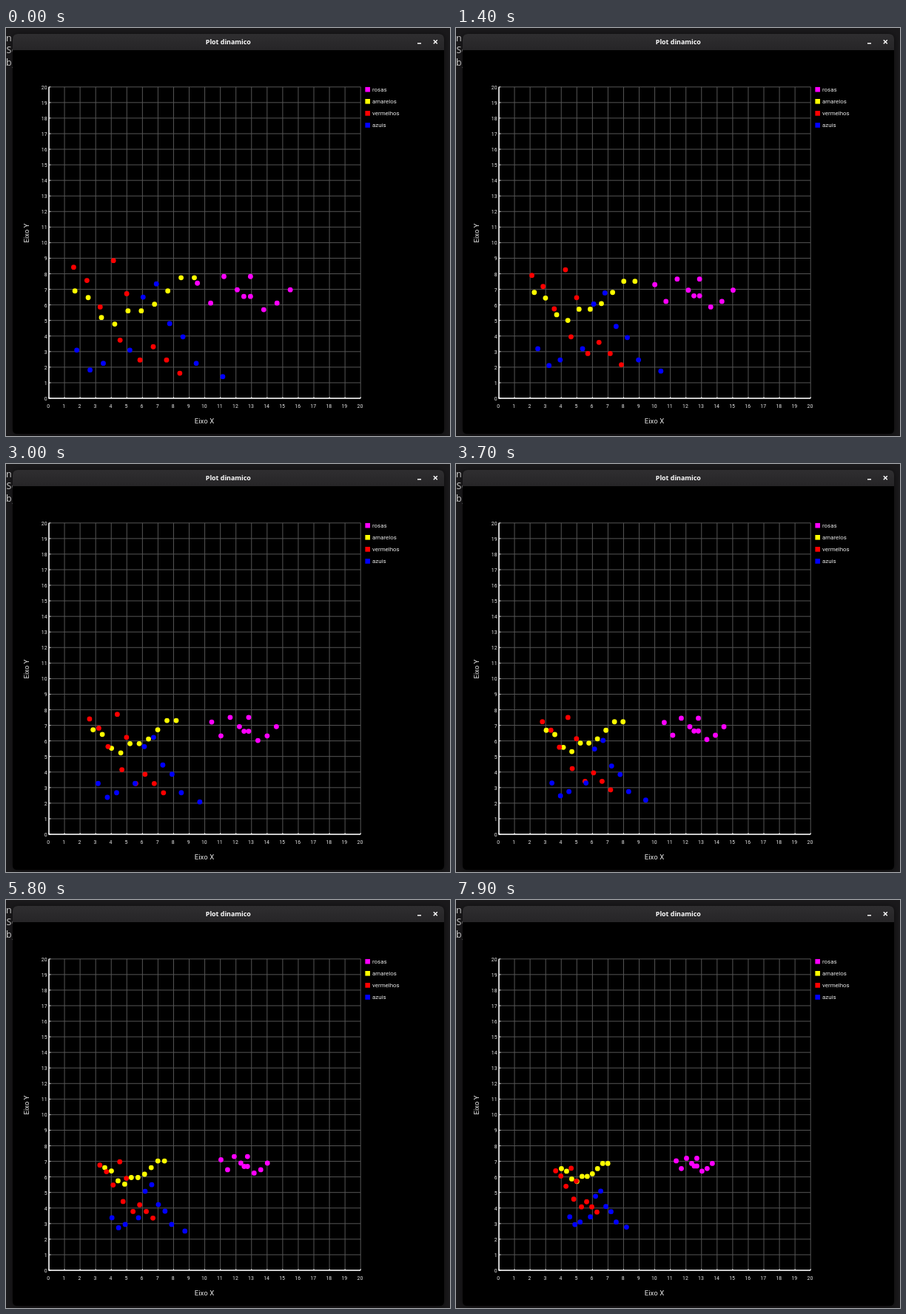
An HTML page that plays this animation: 600 px wide and 552 px high, repeating every 8000 ms.

```html
<!DOCTYPE html>
<html lang="pt">
<head>
<meta charset="utf-8">
<title>Plot dinamico</title>
<style>
  html, body { margin: 0; width: 100%; height: 100%; overflow: hidden; background: #1b1a1c; }
  svg { display: block; width: 600px; height: 552px; }
  text { font-family: Roboto, "Noto Sans", sans-serif; fill: #e8e8e8; }
  .term { font: 13px "Noto Sans Mono", "DejaVu Sans Mono", monospace; fill: #c8c8c8; }
  .title { font: 700 8.9px "Open Sans", "Noto Sans", sans-serif; fill: #fff; text-anchor: middle; }
  .tick { font-size: 6.9px; }
  .name { font-size: 9.6px; text-anchor: middle; }
  .key { font-size: 7.9px; }
  .window { filter: drop-shadow(0 1px 4px rgba(0, 0, 0, .6)); }
</style>
</head>
<body>
<svg viewBox="0 0 600 552">
  <defs>
    <linearGradient id="bar" x1="0" y1="0" x2="0" y2="1">
      <stop offset="0" stop-color="#2f2e30"/>
      <stop offset="1" stop-color="#262527"/>
    </linearGradient>
  </defs>
  <rect width="600" height="552" fill="#1b1a1c"/>
  <text class="term" x="0" y="18">n</text>
  <text class="term" x="0" y="34">So</text>
  <text class="term" x="0" y="51">bj</text>

  <g class="window">
    <path d="M9 30V15q0-7 7-7H585q7 0 7 7V543q0 6-6 6H15q-6 0-6-6Z" fill="#000"/>
  </g>
  <path d="M9 30V15q0-7 7-7H585q7 0 7 7V30Z" fill="url(#bar)"/>
  <text class="title" x="300.3" y="22">Plot dinamico</text>
  <path d="M556 20.7h5M577.8 16.3l5 5m0-5l-5 5" stroke="#fff" stroke-width="1.4"/>

  <g id="grid"></g>
  <text class="name" x="268" y="535">Eixo X</text>
  <text class="name" transform="translate(30.7 277.5) rotate(-90)">Eixo Y</text>
  <g id="legend"></g>
  <g id="dots"></g>
</svg>
<script>
const LOOP = 8000, FRAME = 100;
const SHRINK = 0.99, RATE = 11.9, START = 16;   // factor per step, steps per second, steps already done
const LEFT = 58, BOTTOM = 501, UNIT = 21.06;

const px = x => LEFT + x * UNIT;
const py = y => BOTTOM - y * UNIT;

const groups = [
  { name: 'rosas', color: '#f0f',
    x: [9, 10, 11, 12, 12.5, 13, 13, 14, 15, 16],
    y: [7.5, 6, 8, 7, 6.5, 8, 6.5, 5.5, 6, 7] },
  { name: 'amarelos', color: '#ff0',
    x: [1, 2, 3, 4, 5, 6, 7, 8, 9, 10],
    y: [7, 6.5, 5, 4.5, 5.5, 5.5, 6, 7, 8, 8] },
  { name: 'vermelhos', color: '#f00',
    x: [1, 2, 3, 4, 5, 4.5, 6, 7, 8, 9],
    y: [9, 8, 6, 9.5, 7, 3.5, 2, 3, 2, 1] },
  { name: 'azuis', color: '#00f',
    x: [1, 2, 3, 5, 6, 7, 8, 9, 10, 12],
    y: [3, 1.5, 2, 3, 7, 8, 5, 4, 2, 1] }
];

function add(parent, tag, attrs, text) {
  const el = document.createElementNS('http://www.w3.org/2000/svg', tag);
  for (const key in attrs) el.setAttribute(key, attrs[key]);
  if (text !== undefined) el.textContent = text;
  return parent.appendChild(el);
}

const $ = id => document.getElementById(id);
const mean = list => list.reduce((a, b) => a + b) / list.length;

function drawGrid() {
  const grid = $('grid');
  let lines = '', ticks = '';
  for (let i = 0; i <= 20; i++) {
    const x = px(i), y = py(i);
    lines += `M${x} ${py(20)}V${BOTTOM}M${LEFT} ${y}H${px(20)}`;
    ticks += `M${x} ${BOTTOM}v-2M${LEFT} ${y}h2.5`;
    add(grid, 'text', { class: 'tick', x: x - 0.8, y: 513.5, 'text-anchor': 'middle' }, i);
    add(grid, 'text', { class: 'tick', x: 55.6, y: y + 3, 'text-anchor': 'end' }, i);
  }
  add(grid, 'path', { d: lines, stroke: '#555', fill: 'none' });
  add(grid, 'path', { d: ticks, stroke: '#ddd', fill: 'none' });
  add(grid, 'path', {
    d: `M${LEFT} ${py(20)}V${BOTTOM}H${px(20)}`,
    stroke: '#fff', 'stroke-width': 1.5, fill: 'none'
  });
}

function drawGroup(group, i) {
  const y = 83.2 + i * 16.1;
  add($('legend'), 'rect', { x: 485.4, y: y - 3.3, width: 6.6, height: 6.6, fill: group.color });
  add($('legend'), 'text', { class: 'key', x: 495, y: y + 2.6 }, group.name);
  group.cx = mean(group.x);
  group.cy = mean(group.y);
  group.dots = group.x.map(() => add($('dots'), 'circle', { r: 3.4, fill: group.color }));
}

// Every group contracts towards its own centroid.
function render(ms) {
  const time = Math.floor(ms % LOOP / FRAME) * FRAME / 1000;
  const scale = SHRINK ** (START + Math.round(RATE * time));
  for (const { x, y, cx, cy, dots } of groups) {
    dots.forEach((dot, i) => {
      dot.setAttribute('cx', px(cx + (x[i] - cx) * scale));
      dot.setAttribute('cy', py(cy + (y[i] - cy) * scale));
    });
  }
}

drawGrid();
groups.forEach(drawGroup);
const begin = performance.now();
function tick() {
  render(performance.now() - begin);
  requestAnimationFrame(tick);
}
tick();
</script>
</body>
</html>
```
